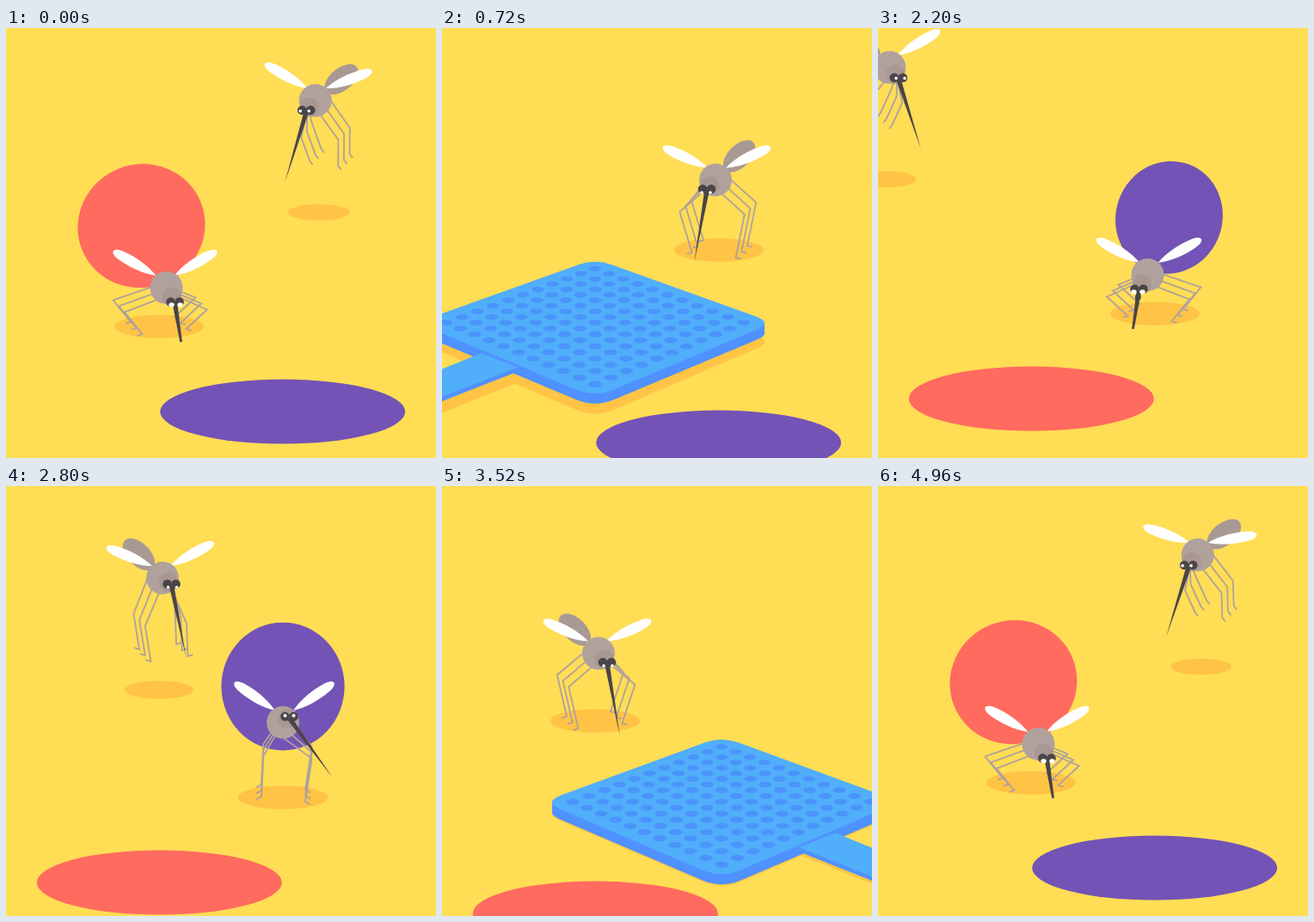
An HTML page that plays this animation: 500 by 500 pixels, repeating every 5 s.

```html
<!DOCTYPE html>
<html lang="en">
<head>
<meta charset="utf-8">
<title>Mosquitoes</title>
<style>
html, body { margin: 0; width: 100%; height: 100%; overflow: hidden; background: #ffdd55; }
svg { display: block; width: 100vw; height: 100vh; }
</style>
</head>
<body>
<svg viewBox="0 0 500 500">
  <defs id="parts"></defs>
  <rect width="500" height="500" fill="#ffdd55"/>
  <g id="stage"></g>
</svg>
<script>
const LOOP = 5000, FLY_IN = 2000, SWING = 5320, HIT = 5560;
const SHADE = '#ffc445', SKIN = '#b0a19c', BELLY = '#a99995', DARK = '#4a4548';
const BLOOD = ['#ff6b5f', '#7353b5'];
const rad = Math.PI / 180, wave = x => Math.sin(Math.PI * x);
const clamp = x => Math.min(1, Math.max(0, x));
const ramp = (a, b, u) => clamp((u - a) / (b - a));
const smooth = (a, b, u) => { const x = ramp(a, b, u); return x * x * (3 - 2 * x); };
const f = n => +n.toFixed(2);
const pts = list => list.map(p => f(p[0]) + ',' + f(p[1])).join(' ');
const ellipse = (x, y, rx, ry, fill) =>
  `<ellipse cx="${f(x)}" cy="${f(y)}" rx="${f(rx)}" ry="${f(ry)}" fill="${fill}"/>`;
const place = (id, x, y, more = '') =>
  `<use href="#${id}" transform="translate(${f(x)} ${f(y)}) ${more}"/>`;

const groundY = u => 97 + .05 * u;

// The whole posture at age u: fly in, stand, drink, take fright.
function posture(u) {
  const dx = -4.73e-4 * Math.max(0, 2798 - u) ** 2;
  const trail = Math.min(1.15, -dx / 42);
  const land = smooth(2800, 3090, u), plunge = smooth(3720, 4190, u), alarm = smooth(5090, 5270, u);
  const blend = (fly, stand, drink, alert) =>
    fly + (stand - fly) * land + (drink - stand) * plunge + (alert - drink) * alarm;
  const settle = Math.max(0, u - 3080), rock = wave(plunge);
  const swell = smooth(4130, 4900, u) + .06 * wave(ramp(4700, 4960, u));
  const h = blend(130, 79, 45, 87) - 5 * Math.exp(-settle / 200) * wave(settle / 100);
  const gx = 178 + dx, gy = groundY(u) + .185 * dx;
  const x = gx + blend(4, 4, 8.5, 0), y = gy - h;
  return {
    u, gx, gy, x, y, h, trail, alarm, swell, air: 1 - land,
    shadow: blend(40 - 4 * trail, 52, 52, 52),
    hx: blend(10.5, 10, 10, -7.5),
    hy: blend(7 + 4.3 * trail, 10.5, 16.5, -7) - 7 * rock,
    beak: blend(11.5 + 5.5 * trail, 10, 9, -36),
    stuck: land === 1 && alarm < .6,
    lift: blend(12, 25, 22 + 8 * swell, 34.5) + 10 * rock,
    tail: blend(45 - 6 * trail, 45, 77 - 9 * swell, 90),
    fill: ramp(4040, 4580, u),
    glint: [blend(1 + trail, 1, 1, 0), blend(3.7 - 2.7 * trail, 4, 3.2, -1), blend(1.8, 1.8, 3.2, 2)]
  };
}

function drawTail(m, blood) {
  const g = m.swell, wobble = -1.4 * g * Math.cos((m.u - 5000) / 300 * Math.PI);
  const a = 23 + 50 * g + wobble, b = 13 + 60 * g - wobble;
  const dist = 39 + 38.6 * g - 35.6 * m.alarm;
  let out = ellipse(0, 0, a, b, m.fill === 1 ? blood : BELLY);
  if (m.fill > 0 && m.fill < 1) {
    const lx = a * (2 * m.fill - 1), ly = b * Math.sqrt(1 - (lx / a) ** 2);
    out += `<path fill="${blood}" d="M${f(lx)} ${f(ly)}A${f(a)} ${f(b)} 0 ${m.fill > .5 ? 1 : 0} 1 `
      + `${f(lx)} ${f(-ly)}Q${f(lx + .4 * ly)} 0 ${f(lx)} ${f(ly)}"/>`;
  }
  const x = m.x - dist * Math.cos(m.tail * rad), y = m.y - dist * Math.sin(m.tail * rad);
  return `<g transform="translate(${f(x)} ${f(y)}) rotate(${f(180 + m.tail)})">${out}</g>`;
}

// Feet stay on the ground; knees spread and sink as the body comes down.
const legs = [
  { side: -1, hip: [-17, -1], row: [8, 5.5], foot: [-33, -5], drift: 10, lag: 13, spread: 66 },
  { side: 1, hip: [11, 2], row: [-1.5, 3], foot: [18, -11], drift: 2, lag: 23, spread: 55 }
];

function drawLegs({ x, y, gx, gy, h, trail, air, alarm }) {
  let out = '';
  for (const leg of legs) for (let i = 0; i < 3; i++) {
    const ox = gx + 6.7 * i * (1 - alarm), oy = gy + 7 * i;
    const hip = [
      x + leg.hip[0] + leg.row[0] * i + (leg.side < 0 ? 3 * alarm : 0),
      y + leg.hip[1] + leg.row[1] * i + 6 * alarm
    ];
    const knee = [
      ox + leg.side * (leg.spread - .28 * h - 8 * alarm) - .5 * leg.lag * trail,
      oy - .68 * h - (leg.side > 0 ? 3 : 0) - 10 * trail
    ];
    const foot = [
      ox + leg.foot[0] + air * (leg.drift - leg.lag * trail) + 7 * alarm,
      oy + leg.foot[1] - air * (42 + 21 * trail) - 4 * alarm
    ];
    const hang = Math.min(1, trail);
    const toe = [
      foot[0] + leg.side * 6 * (1 - hang) - 3.5 * hang,
      foot[1] + 1.5 - 3.5 * air + 6.5 * hang + 2 * alarm
    ];
    out += `<polyline points="${pts([hip, knee, foot, toe])}"/>`;
  }
  return `<g fill="none" stroke="${SKIN}" stroke-width="1.8">${out}</g>`;
}

function drawWings(m) {
  const lift = m.lift + 14 * m.air * Math.sin((8 + (m.u - 2460) * 2.4) * rad);
  const tilt = m.air * (3 + 1.6 * m.trail);
  const wing = (dx, turn) => place('wing', m.x + dx, m.y - 14, `rotate(${f(turn)})`);
  return wing(-12, 180 + lift - tilt) + wing(9, -lift - tilt);
}

function drawBeak(m) {
  const x = m.x + m.hx, y = m.y + m.hy + 2, full = 85;
  const sx = Math.sin(m.beak * rad), sy = Math.cos(m.beak * rad);
  const len = m.stuck ? Math.min(full, (m.gy + 18 - y) / sy) : full;
  const w = 2.8 * (1 - len / full);
  const at = (d, k) => [x + d * sx + k * sy, y + d * sy - k * sx];
  let out = `<polygon fill="${DARK}" points="${pts([at(0, -2.8), at(0, 2.8), at(len, w), at(len, -w)])}"/>`;
  const sip = m.u - 4088;
  if (sip > 0 && sip < 800) out += ellipse(...at(len * (1 - sip % 160 / 160), 0), 3.5, 3.5, DARK);
  return out;
}

function drawMosquito(m, blood) {
  const { x, y, hx, hy } = m, [ox, oy, r] = m.glint;
  const pair = (dx, dy, rx, ry, fill) =>
    [-5, 5].map(d => ellipse(x + hx + d + dx, y + hy + dy, rx, ry, fill)).join('');
  return drawTail(m, blood) + drawLegs(m) + drawWings(m)
    + ellipse(x, y, 19, 19, SKIN)
    + ellipse(x + .65 * hx, y + .65 * hy, 11, 11, '#a89792')
    + pair(0, 0, 5.3, 5.3, DARK) + drawBeak(m) + pair(ox, oy, r, Math.min(r, 1 + .5 * r), '#fff');
}

// Swing down, one small bounce, then slide out along the grip.
function swatterPose(u) {
  const far = 1 - ramp(SWING, HIT, u) ** 2;
  const out = .0019 * Math.max(0, u - 5980) ** 2;
  return {
    x: 178 - 420 * far - out,
    y: groundY(u) - 18.7 + .41 * out,
    h: 330 * far + 8.3 * wave(ramp(HIT, 5860, u))
  };
}

// Perspective grid of the swatter's face, centred on cell (5, 5).
function grid(s, t) {
  const p = (s + t) / 20, w = 1.14 * (1 - p) + p;
  return [(s - t) * 18.5 / w, (73 * p - 73 * (1 - p)) / w, w];
}

function buildParts() {
  const lo = -1, hi = 11, r = 1.2;
  const at = (s, t) => { const p = grid(s, t); return f(p[0]) + ' ' + f(p[1]); };
  const face = `M${at(lo + r, lo)}L${at(hi - r, lo)}Q${at(hi, lo)} ${at(hi, lo + r)}`
    + `L${at(hi, hi - r)}Q${at(hi, hi)} ${at(hi - r, hi)}`
    + `L${at(lo + r, hi)}Q${at(lo, hi)} ${at(lo, hi - r)}`
    + `L${at(lo, lo + r)}Q${at(lo, lo)} ${at(lo + r, lo)}Z`;
  const grip = 'M-132 36L-400 146V177L-90 53Z';
  let holes = '';
  for (let s = 0; s <= 10; s++) for (let t = 0; t <= 10; t++) {
    const [x, y, w] = grid(s, t);
    holes += ellipse(x, y, 7.9 / w, 3.6 / w, '#4a94fb');
  }
  const side = '#4f91ff', top = '#51aefb';
  document.getElementById('parts').innerHTML =
    `<path id="wing" fill="#fff" d="M0 0C15 -6 33 -7 47 -5.5C61 -4 61 4 47 5.5C33 7 15 6 0 0"/>
    <g id="cast" fill="${SHADE}"><path d="${face}"/><path d="${grip}" transform="translate(0 -5)"/></g>
    <g id="swatter">
      <g fill="${side}"><path d="${face}" transform="translate(0 12)"/>
      <path d="${face}" transform="translate(0 6)"/><rect x="-197" width="394" height="12"/>
      <path d="${grip}" transform="translate(0 5)"/></g>
      <path d="${grip}" fill="${top}"/>
      <path d="${face}" fill="${top}"/>${holes}
    </g>`;
}

const stage = document.getElementById('stage');

function render(time) {
  const layers = ['', '', '', ''];
  BLOOD.forEach((blood, side) => {
    const add = (layer, art) => {
      layers[layer] += side ? `<g transform="translate(500) scale(-1 1)">${art}</g>` : art;
    };
    const p = (time + side * LOOP / 2) % LOOP, late = p + LOOP;
    const u = p < FLY_IN ? late : p;
    if (u < HIT) {
      const m = posture(u);
      add(1, ellipse(m.gx, m.gy, m.shadow, m.shadow * .262, SHADE));
      add(2, drawMosquito(m, blood));
    }
    if (u > SWING && u < 6460) {
      const s = swatterPose(u), pitch = 1 - .003 * Math.min(s.h, 30);
      add(0, place('cast', s.x, s.y));
      add(3, place('swatter', s.x, s.y - 13.5 - s.h, `scale(1 ${f(pitch)})`));
    }
    if (late >= HIT) add(0, ellipse(178.3, groundY(late) - 26, 142.5, 37.5, blood));
  });
  stage.innerHTML = layers.join('');
}

buildParts();
const start = performance.now();
function tick() {
  render((performance.now() - start) % LOOP);
  requestAnimationFrame(tick);
}
tick();
</script>
</body>
</html>
```
